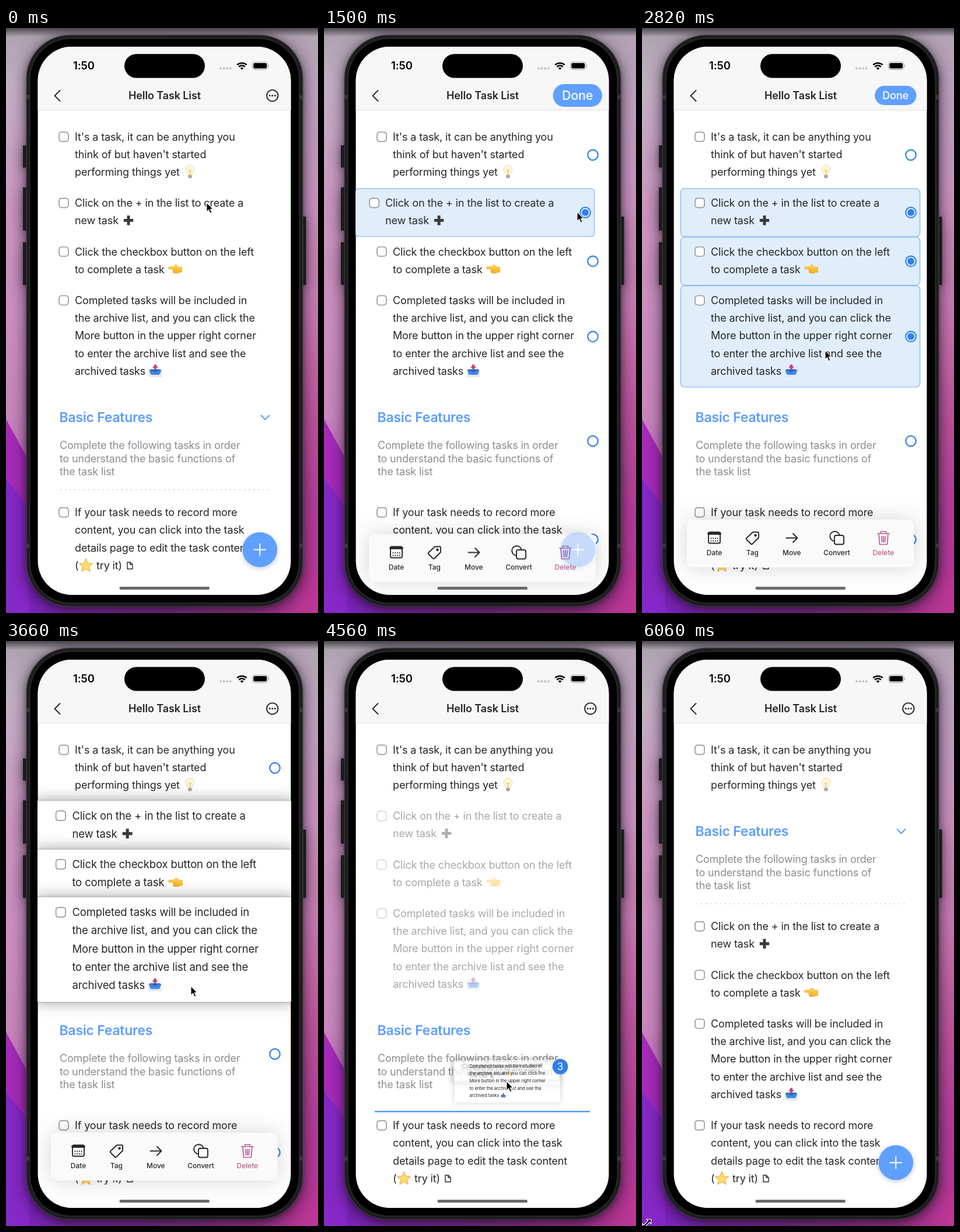
Recreate the animation shown at these times as an HTML page. Size 535x1002 px, loop 6.12 s.

```html
<!DOCTYPE html>
<html lang="en">
<head>
<meta charset="utf-8">
<title>Hello Task List</title>
<style>
html, body { margin: 0; width: 100%; height: 100%; overflow: hidden; background: #000; }
svg { display: block; width: 535px; height: 1002px; }
text { font: 400 18px Inter, Roboto, sans-serif; letter-spacing: -.14px; font-optical-sizing: none; fill: #262628; white-space: pre; }
.title { font-weight: 600; font-size: 18px; letter-spacing: -.12px; text-anchor: middle; }
.head { font-weight: 600; font-size: 23px; letter-spacing: -.24px; fill: #5c9dff; }
.desc { fill: #8c8c94; letter-spacing: -.19px; }
.label { font-size: 12px; font-weight: 500; letter-spacing: 0; text-anchor: middle; }
.line { fill: none; stroke: #262628; stroke-width: 1.9; stroke-linecap: round; stroke-linejoin: round; }
.box { fill: #fff; stroke: #9a9a9e; stroke-width: 1.7; }
.sheet { fill: #fff; filter: drop-shadow(0 0 1.5px rgba(0,0,0,.35)) drop-shadow(0 0 13px rgba(0,0,0,.4)); }
.pick { fill: #e0eefc; stroke: #6fa8f4; stroke-width: 1.1; }
.phone { filter: drop-shadow(0 2px 5px rgba(20,10,25,.4)) drop-shadow(0 6px 15px rgba(20,10,25,.6)); }

/* one 6.12 s loop for every part */
.an { animation: 6.12s linear infinite; }
.row2 { transform-origin: 271.5px 316px; animation-name: row2; }
.row3 { transform-origin: 271.5px 399.5px; animation-name: row3; }
.row4 { transform-origin: 271.5px 528.5px; animation-name: row4; }
.lift { animation-name: lift; }
.on2 { animation-name: on2; }
.on3 { animation-name: on3; }
.on4 { animation-name: on4; }
.ringRow { animation-name: ringRow; }
.ringList { animation-name: ringList; }
.ringHead { animation-name: ringHead; }
.section { animation-name: section; }
.extras { animation-name: extras; }
.ghost { animation-name: ghost; }
.mark1 { animation-name: mark1; }
.mark2 { animation-name: mark2; }
.badge { animation-name: badge; }
.more { animation-name: more; }
.done { transform-origin: 434.7px 115.5px; animation-name: done; }
.bar { animation-name: bar; filter: drop-shadow(0 0 18px rgba(0,0,0,.17)); }
.fab { animation-name: fab; }
.cursor { animation-name: cursor; animation-timing-function: ease-in-out; }
.arrow { animation-name: arrow; }
.resize { animation-name: resize; }

@keyframes row2 {
  0%, 14.71% { transform: translate(0, 0); }
  21.57% { transform: translate(-28px, 0); }
  24.51% { transform: translate(-13px, 0); }
  27.45%, 53.92% { transform: translate(0, 0) scale(1) rotate(0deg); }
  56.86%, 60.29% { transform: translate(0, 0) scale(1.03) rotate(0deg); animation-timing-function: ease-in-out; }
  65.69% { transform: translate(44.5px, 398px) scale(.42) rotate(1.5deg); }
  71.57%, 77.45% { transform: translate(42.5px, 425px) scale(.42) rotate(1.5deg); }
  81.37% { transform: translate(7px, 232px) scale(.81) rotate(.2deg); animation-timing-function: ease-out; }
  85.29%, 100% { transform: translate(0, 189px) scale(1) rotate(0deg); }
}
@keyframes row3 {
  0%, 53.92% { transform: translate(0, 0) scale(1) rotate(0deg); }
  56.86%, 60.29% { transform: translate(0, 0) scale(1.03) rotate(0deg); animation-timing-function: ease-in-out; }
  65.69% { transform: translate(38px, 308.5px) scale(.42) rotate(-.8deg); }
  71.57%, 77.45% { transform: translate(40px, 335.5px) scale(.42) rotate(-.8deg); }
  81.37% { transform: translate(6.3px, 216px) scale(.81) rotate(0deg); animation-timing-function: ease-out; }
  85.29%, 100% { transform: translate(0, 189px) scale(1) rotate(0deg); }
}
@keyframes row4 {
  0%, 53.92% { transform: translate(0, 0) scale(1) rotate(0deg); }
  56.86%, 60.29% { transform: translate(0, 0) scale(1.03) rotate(0deg); animation-timing-function: ease-in-out; }
  65.69% { transform: translate(44.5px, 198px) scale(.42) rotate(0deg); }
  71.57%, 77.45% { transform: translate(42.5px, 225.5px) scale(.42) rotate(0deg); }
  81.37% { transform: translate(7.5px, 196px) scale(.81) rotate(.6deg); animation-timing-function: ease-out; }
  85.29%, 100% { transform: translate(0, 189px) scale(1) rotate(0deg); }
}
@keyframes lift {
  0%, 53.92% { opacity: 0; }
  56.86%, 60.78% { opacity: 1; }
  65.69%, 77.45% { opacity: .4; }
  80.4%, 81.37% { opacity: 1; }
  85.29%, 100% { opacity: 0; }
}
@keyframes on2 { 0%, 21.57% { opacity: 0; } 22.55%, 53.92% { opacity: 1; } 56.86%, 100% { opacity: 0; } }
@keyframes on3 { 0%, 31.37% { opacity: 0; } 32.35%, 53.92% { opacity: 1; } 56.86%, 100% { opacity: 0; } }
@keyframes on4 { 0%, 37.25% { opacity: 0; } 38.24%, 53.92% { opacity: 1; } 56.86%, 100% { opacity: 0; } }
@keyframes ringRow { 0%, 21.57% { opacity: 0; } 23.53%, 53.92% { opacity: 1; } 56.86%, 100% { opacity: 0; } }
@keyframes ringList { 0%, 21.57% { opacity: 0; } 23.53%, 61.76% { opacity: 1; } 63.73%, 100% { opacity: 0; } }
@keyframes ringHead { 0%, 21.57% { opacity: 0; } 23.53%, 66.67% { opacity: 1; } 68.63%, 100% { opacity: 0; } }
@keyframes section {
  0%, 77.45% { transform: translate(0, 0); }
  81.37% { transform: translate(0, -320px); animation-timing-function: ease-out; }
  85.29%, 100% { transform: translate(0, -341px); }
}
@keyframes extras { 0%, 21.57% { opacity: 1; } 23.53%, 77.45% { opacity: 0; } 80.4%, 100% { opacity: 1; } }
@keyframes ghost { 0%, 60.29% { opacity: 0; } 60.3%, 77.45% { opacity: .4; } 79.41%, 100% { opacity: 0; } }
@keyframes mark1 { 0%, 63.7% { opacity: 0; } 63.73%, 68.6% { opacity: 1; } 68.63%, 100% { opacity: 0; } }
@keyframes mark2 { 0%, 68.6% { opacity: 0; } 68.63%, 77.45% { opacity: 1; } 81.37% { opacity: .4; } 83.33%, 100% { opacity: 0; } }
@keyframes badge {
  0%, 62.75% { opacity: 0; transform: translate(409px, 672px); }
  64.71% { opacity: 1; }
  65.69% { transform: translate(407px, 702px); }
  71.57%, 77.45% { opacity: 1; transform: translate(405px, 729px); }
  78.43%, 100% { opacity: 0; transform: translate(405px, 729px); }
}
@keyframes more { 0%, 21.57% { opacity: 1; } 22.55%, 54.9% { opacity: 0; } 56.86%, 100% { opacity: 1; } }
@keyframes done {
  0%, 21.57% { opacity: 0; transform: scale(.4); }
  23.53% { opacity: 1; }
  24.51% { transform: scale(1.18); }
  27.45%, 53.92% { opacity: 1; transform: scale(1); }
  56.86%, 100% { opacity: 0; transform: scale(.7); }
}
@keyframes bar {
  0%, 21.57% { opacity: 0; transform: translate(0, 130px); }
  22.06% { opacity: 1; }
  24.51% { transform: translate(0, 25px); animation-timing-function: ease-out; }
  27.45%, 60.78% { opacity: 1; transform: translate(0, 0); animation-timing-function: ease-in; }
  64.71%, 100% { opacity: 0; transform: translate(0, 130px); }
}
@keyframes fab { 0%, 21.57% { opacity: 1; } 25.98%, 77.45% { opacity: 0; } 79.41%, 100% { opacity: 1; } }
@keyframes cursor {
  0%, 4.9% { transform: translate(344px, 299px); }
  13.73%, 14.71% { transform: translate(462px, 318px); }
  21.57%, 24.51% { transform: translate(434px, 315px); }
  30.39%, 32.35% { transform: translate(458px, 398px); }
  36.27%, 38.24% { transform: translate(458px, 526px); }
  44.12%, 54.9% { transform: translate(314px, 552px); }
  59.8% { transform: translate(317px, 591px); }
  65.69% { transform: translate(315px, 727px); }
  71.57%, 85.29% { transform: translate(313px, 754px); }
  98.04%, 100% { transform: translate(8px, 997px); }
}
@keyframes arrow { 0%, 98% { opacity: 1; } 98.04%, 100% { opacity: 0; } }
@keyframes resize { 0%, 98% { opacity: 0; } 98.04%, 100% { opacity: 1; } }
</style>
</head>
<body>
<svg viewBox="0 0 535 1002" xmlns="http://www.w3.org/2000/svg">
<defs>
  <linearGradient id="skyL" x2="0" y2="1">
    <stop stop-color="#aaa0ac"/><stop offset=".1" stop-color="#c5b2c6"/><stop offset=".3" stop-color="#cf99c4"/><stop offset=".66" stop-color="#cc88c0"/><stop offset="1" stop-color="#a92bbf"/>
  </linearGradient>
  <linearGradient id="skyR" x2="0" y2="1">
    <stop stop-color="#b0a2b1"/><stop offset=".1" stop-color="#bfa5c0"/><stop offset=".3" stop-color="#ce95c3"/><stop offset=".48" stop-color="#cb7cb5"/><stop offset=".66" stop-color="#c0559f"/><stop offset=".82" stop-color="#b63d9c"/><stop offset="1" stop-color="#b8369a"/>
  </linearGradient>
  <linearGradient id="floor">
    <stop stop-color="#7d23bd"/><stop offset=".5" stop-color="#84308f"/><stop offset="1" stop-color="#bd3796"/>
  </linearGradient>
  <linearGradient id="lid" x2="0" y2="1">
    <stop stop-color="#4b474d"/><stop offset="1" stop-color="#4b474d" stop-opacity="0"/>
  </linearGradient>
  <linearGradient id="skin" x2="0" y2="1"><stop stop-color="#ffd84a"/><stop offset="1" stop-color="#f5b02c"/></linearGradient>
  <clipPath id="screen"><rect x="54.6" y="32" width="433.8" height="939" rx="58"/></clipPath>

  <rect id="box" class="box" x="-8" y="-8" width="16" height="16" rx="4.2"/>
  <circle id="ring" r="8.8" fill="#fff" stroke="#2f80ec" stroke-width="2.2"/>
  <circle id="dot" r="6" fill="#2f80ec"/>
  <g id="bulb">
    <path d="M-3.4 6C-3.4 2-7.3 1-7.3-4A7.3 7.3 0 0 1 7.3-4C7.3 1 3.4 2 3.4 6Z" fill="#fdf6d8" stroke="#e2d9b8" stroke-width=".9"/>
    <path d="M-2.6-3L0-1L2.6-3M0-1V5" fill="none" stroke="#f3c63c" stroke-width="1.4"/>
    <rect x="-3.3" y="5.6" width="6.6" height="5.6" rx="1.6" fill="#a8a8ad"/>
  </g>
  <path id="plus" d="M-8.2 0H8.2M0-8.2V8.2" stroke="#3b3b3f" stroke-width="5"/>
  <g id="hand" fill="url(#skin)" stroke="#e09a26" stroke-width=".6">
    <path d="M-9.5-4H-3.5L0-6.8Q1.500-7.800 3-6.600L6.500-3.600H11.500V5.500H7.500L5 7H-1Q-4 7-3.600 4L-4.200 0H-9.500A2 2 0 0 1-9.500-4Z"/>
    <path d="M-3.600 0H2.400M-3.400 2.400H2.400M-2.800 4.800H2" fill="none"/>
  </g>
  <g id="tray">
    <path d="M-11 1L-9-1H9L11 1V10.500H-11Z" fill="#e4e7ee"/>
    <path d="M-10.500-2H10.500L8 5Q7.400 6.600 5.500 6.600H-5.500Q-7.400 6.600-8 5Z" fill="#4285e6"/>
    <path d="M-7.500-3H7.500L10.500-1H4.500Q3 1.500 0 1.500T-4.500-1H-10.500Z" fill="#2f5fb6"/>
    <path d="M-2.200-11H2.200V-7.500H5L0-2L-5-7.500H-2.200Z" fill="#bb4680"/>
  </g>
  <path id="star" d="M0-11.5L3.4-4L11.5-3.2L5.4 2.1L7.2 10.2L0 6L-7.2 10.2L-5.4 2.1L-11.5-3.2L-3.4-4Z" fill="#ffdc70" stroke="#e8b450" stroke-width="1.2" stroke-linejoin="round"/>

  <g id="task2">
    <use href="#box" x="99" y="299.7"/>
    <text y="306"><tspan x="118">Click on the + in the list to create a</tspan><tspan x="118" dy="30.2">new task</tspan></text>
    <use href="#plus" x="210" y="329.5"/>
  </g>
  <g id="task3">
    <use href="#box" x="99" y="383"/>
    <text y="389.5"><tspan x="118">Click the checkbox button on the left</tspan><tspan x="118" dy="30.2">to complete a task</tspan></text>
    <use href="#hand" x="290" y="413"/>
  </g>
  <g id="task4">
    <use href="#box" x="99" y="466.5"/>
    <text y="472.8"><tspan x="118">Completed tasks will be included in</tspan><tspan x="118" dy="30.3">the archive list, and you can click the</tspan><tspan x="118" dy="30.3">More button in the upper right corner</tspan><tspan x="118" dy="30.3">to enter the archive list and see the</tspan><tspan x="118" dy="30.3">archived tasks</tspan></text>
    <use href="#tray" x="256" y="587.5"/>
  </g>
</defs>

<!-- backdrop -->
<rect width="268" height="1002" fill="url(#skyL)"/>
<rect x="267" width="268" height="1002" fill="url(#skyR)"/>
<path d="M0 670L45 752V1002H0Z" fill="#a92bbd"/>
<path d="M0 772L60 848V1002H0Z" fill="#8728c8"/>
<rect x="40" y="930" width="495" height="72" fill="url(#floor)"/>
<rect width="535" height="15" fill="url(#lid)"/>

<!-- phone body -->
<g class="phone">
  <path d="M29 201h8v38h-8zM29 273h8v74h-8zM29 367h8v73h-8zM507 323h7.5v117h-7.5z" fill="#1a1a1c"/>
  <rect x="35" y="12" width="474" height="979" rx="75" fill="#1d1d1f" stroke="#48484b" stroke-width=".9"/>
</g>
<path d="M35.5 115h5v7h-5zM503.5 115h5v7h-5zM35.5 883h5v7h-5zM503.5 883h5v7h-5z" fill="#39393b"/>
<rect x="41" y="18" width="462" height="967" rx="70" fill="#000" stroke="#3b3b3d"/>

<g clip-path="url(#screen)">
  <rect x="54" y="32" width="435" height="939" fill="#fff"/>

  <!-- list -->
  <use href="#box" x="99" y="186.3"/>
  <text y="192.5"><tspan x="118">It's a task, it can be anything you</tspan><tspan x="118" dy="30.2">think of but haven't started</tspan><tspan x="118" dy="30.2">performing things yet</tspan></text>
  <use href="#bulb" x="315.5" y="246"/>

  <use href="#box" x="99" y="829.7"/>
  <text y="836"><tspan x="118">If your task needs to record more</tspan><tspan x="118" dy="30.3">content, you can click into the task</tspan><tspan x="118" dy="30.3">details page to edit the task content</tspan><tspan x="118" dy="30.3">(</tspan><tspan x="155">try it)</tspan></text>
  <use href="#star" x="137" y="920.5"/>
  <path class="line" style="stroke-width:1.4" d="M208 915H213L217 919V926.5H208ZM213 915V919H217"/>

  <g class="an ringList">
    <use href="#ring" x="461" y="217.5"/>
    <use href="#ring" x="461" y="876"/>
  </g>

  <g class="an section">
    <text class="head" x="91.5" y="675">Basic Features</text>
    <text class="desc" y="721.2"><tspan x="92">Complete the following tasks in order</tspan><tspan x="92" dy="22.4">to understand the basic functions of</tspan><tspan x="92" dy="22.4">the task list</tspan></text>
    <g class="an extras">
      <path class="line" style="stroke:#5c9dff;stroke-width:2" d="M437.5 663.5L444.5 670.5L451.5 663.5"/>
      <path class="line" style="stroke:#cfcfd3;stroke-width:2.2" stroke-dasharray="0 8.08" d="M94 791H450"/>
    </g>
    <g class="an ringHead"><use href="#ring" x="461" y="707.5"/></g>
  </g>

  <g class="an ghost" opacity="0"><use href="#task2"/><use href="#task3"/><use href="#task4"/></g>

  <path class="an mark1" d="M87 659H457" stroke="#4f98f8" stroke-width="2.4"/>
  <path class="an mark2" d="M87 806H456" stroke="#4f98f8" stroke-width="2.4"/>

  <!-- rows that get picked and dragged -->
  <g class="an row2">
    <g class="an lift"><rect class="sheet" x="55" y="275" width="433" height="82" rx="5"/></g>
    <rect class="pick an on2" x="66.5" y="275" width="410" height="82.3" rx="6"/>
    <use href="#task2"/>
    <g class="an ringRow"><use href="#ring" x="461" y="316"/></g>
    <g class="an on2"><use href="#dot" x="461" y="316"/></g>
  </g>
  <g class="an row3">
    <g class="an lift"><rect class="sheet" x="55" y="358.5" width="433" height="82" rx="5"/></g>
    <rect class="pick an on3" x="66.5" y="358.2" width="410" height="82.3" rx="6"/>
    <use href="#task3"/>
    <g class="an ringRow"><use href="#ring" x="461" y="399.5"/></g>
    <g class="an on3"><use href="#dot" x="461" y="399.5"/></g>
  </g>
  <g class="an row4">
    <g class="an lift"><rect class="sheet" x="55" y="441.5" width="433" height="174" rx="5"/></g>
    <rect class="pick an on4" x="66.5" y="441.5" width="410" height="173.5" rx="6"/>
    <use href="#task4"/>
    <g class="an ringRow"><use href="#ring" x="461" y="528.5"/></g>
    <g class="an on4"><use href="#dot" x="461" y="528.5"/></g>
  </g>

  <g class="an badge">
    <circle r="13.3" fill="#2f80ec"/>
    <text y="6" style="fill:#fff;font-size:17px;text-anchor:middle">3</text>
  </g>

  <!-- header -->
  <rect x="54" y="32" width="435" height="108" fill="#f7f7f7"/>
  <path d="M54 140.5H489" stroke="#dedee0"/>
  <text x="115" y="71" style="font-weight:600;font-size:18.5px;fill:#000">1:50</text>
  <rect x="203" y="44.5" width="138" height="41" rx="20.5"/>
  <path d="M368 69.3H386" stroke="#c3c3c6" stroke-width="4" stroke-linecap="round" stroke-dasharray="0 5.6"/>
  <g fill="none" stroke="#000" stroke-width="2.5">
    <path d="M396.3 63.2A11.8 11.8 0 0 1 412.7 63.2M399.3 66.5A7.4 7.4 0 0 1 409.7 66.5"/>
    <path d="M404.5 71.8L401.7 68.8A4.2 4.2 0 0 1 407.3 68.8Z" fill="#000" stroke="none"/>
  </g>
  <rect x="422.5" y="58.3" width="26.5" height="12.8" rx="4" fill="none" stroke="#a5a5a8" stroke-width="1.1"/>
  <rect x="424.3" y="60.1" width="22.9" height="9.2" rx="2.5"/>
  <path d="M450.5 62.5Q452.7 64.7 450.5 67Z" fill="#a5a5a8"/>
  <path class="line" d="M92.5 107L83.5 116L92.5 125"/>
  <text class="title" x="272" y="122">Hello Task List</text>
  <g class="an more">
    <circle class="line" cx="456.8" cy="115.8" r="9.7"/>
    <path class="line" style="stroke-width:3" stroke-dasharray="0 4.5" d="M452.3 115.8H461.5"/>
  </g>
  <g class="an done" opacity="0">
    <rect x="399" y="99" width="71.5" height="33" rx="16.5" fill="#5f9fff"/>
    <text x="434.7" y="122.2" style="fill:#fff;font-weight:500;text-anchor:middle;letter-spacing:0">Done</text>
  </g>

  <!-- action bar -->
  <g class="an bar" opacity="0">
    <rect x="77" y="842" width="389" height="82" rx="10" fill="#fafafa"/>
    <g class="line">
      <rect x="114" y="863.5" width="20" height="19" rx="2.5"/>
      <path d="M114 866H134" stroke-width="4"/>
      <path d="M118.5 874H131M118.5 878.5H131" stroke-dasharray="0 3.7" stroke-width="2.2"/>
      <path d="M190 863.5H198.5Q200 863.5 200 865V873L189.5 883.5Q188 885 186.5 883.5L179.5 876.5Q178 875 179.5 873.5Z"/>
      <circle cx="194.5" cy="869" r="1.3"/>
      <path d="M247.5 873.5H266.5M259 866L266.5 873.5L259 881"/>
      <circle cx="330.5" cy="870.5" r="8.3"/>
      <rect x="330" y="869" width="16" height="15.5" rx="3" style="fill:#fafafa"/>
      <path d="M404 866H424M409.5 866V862.5H418.5V866M406 866L407.5 884.5H420.5L422 866M411 870.5L411.5 880.5M414 870.5V880.5M417 870.5L416.5 880.5" style="stroke:#b95c93;stroke-width:1.7"/>
    </g>
    <text class="label" x="124" y="903">Date</text>
    <text class="label" x="189.3" y="903">Tag</text>
    <text class="label" x="256.8" y="903">Move</text>
    <text class="label" x="334" y="903">Convert</text>
    <text class="label" x="414" y="903" style="fill:#b95c93">Delete</text>
  </g>

  <g class="an fab">
    <circle cx="435.3" cy="893.5" r="29.8" fill="#5f9fff" style="filter:drop-shadow(0 2px 4px rgba(40,70,130,.3))"/>
    <path d="M425.3 893.5H445.3M435.3 883.5V903.5" stroke="#fff" stroke-width="2" stroke-linecap="round"/>
  </g>
  <rect x="194.5" y="957" width="154.5" height="5" rx="2.5" fill="#6a6a6c"/>
</g>

<!-- pointer -->
<g class="an cursor">
  <path class="an arrow" d="M0 0V15.8L3.6 12.5L6.2 18.4L8.9 17.2L6.4 11.4H11.2Z" stroke="#fff" stroke-width="1.1"/>
  <path class="an resize" opacity="0" d="M7.5-6.5V1L5-1.5L-2.5 6L0 8.5H-7.5V1L-5 3.5L2.5-4L0-6.5Z" stroke="#fff" stroke-width="1.1"/>
</g>
</svg>
</body>
</html>
```
